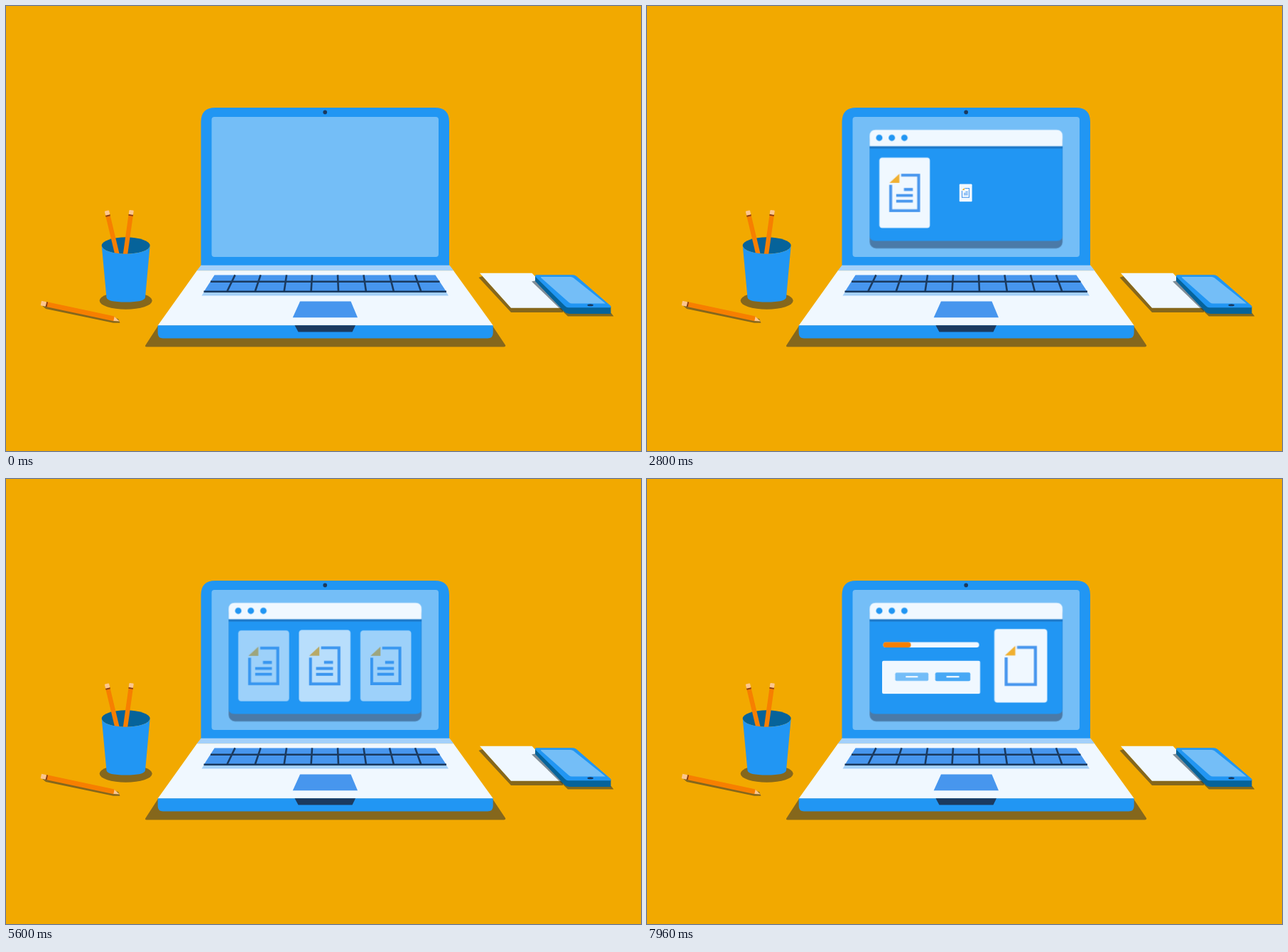
Animation, 894 px wide and 626 px high, one loop 8000 ms. Source, as an HTML page without scripts:

```html
<!DOCTYPE html>
<html lang="en">
<head>
<meta charset="utf-8">
<title>Desk</title>
<style>
  html, body { margin: 0; width: 100%; height: 100%; overflow: hidden; background: #f2a900; }
  svg { display: block; width: 100vw; height: 100vh; }

  .blue { fill: #2196f3; }
  .sky { fill: #74bef7; }
  .deep { fill: #06639a; }
  .navy { fill: #1b3a5f; }
  .white { fill: #f0f8ff; }
  .key { fill: #4796ee; }
  .pale { fill: #a3d0fa; }
  .shade { fill: #85671c; }
  .orange { fill: #f77f00; }
  .cream { fill: #fcc68e; }
  .band { fill: #8a3d12; }
  .line { fill: none; stroke: #4796ee; stroke-width: 4; }

  .anim { animation: 8s ease-in-out infinite both; }
  .window { animation-name: window; }
  .splash { animation-name: splash; }
  .move { animation-name: move; }
  .one { animation-name: one; }
  .two { animation-name: two; }
  .three { animation-name: three; }
  .text { animation-name: text; }
  .pop { animation-name: pop; }
  .cancel { animation-name: cancel; }
  .accept { animation-name: accept; }

  @keyframes window {
    0%, 7% { transform: scale(0); }
    12.5%, 100% { transform: scale(1); }
  }
  @keyframes splash {
    0%, 16% { transform: translateY(12px); opacity: 0; }
    21.5%, 30% { transform: none; opacity: 1; }
    33%, 100% { transform: translateY(12px); opacity: 0; }
  }
  @keyframes one {
    0%, 32.5% { transform: scale(0); opacity: 1; }
    35.5% { transform: scale(1.05); }
    37%, 40.5% { transform: scale(1); opacity: 1; }
    42.5% { transform: scale(1); opacity: .6; }
    45%, 50% { transform: scale(1.04); opacity: 1; }
    52.5%, 70% { transform: scale(1); opacity: .6; }
    72.5%, 82.5% { transform: scale(1.04); opacity: 1; }
    84% { transform: scale(1.14); }
    85.5%, 100% { transform: scale(1.04); opacity: 1; }
  }
  @keyframes two {
    0%, 34% { transform: scale(0); opacity: 1; }
    37% { transform: scale(1.05); }
    38.5%, 40.5% { transform: scale(1); opacity: 1; }
    42.5%, 61% { transform: scale(1); opacity: .6; }
    63.5%, 68.5% { transform: scale(1.04); opacity: 1; }
    71%, 83% { transform: scale(1); opacity: .6; }
    88%, 100% { transform: scale(0); opacity: .6; }
  }
  @keyframes three {
    0%, 36% { transform: scale(0); opacity: 1; }
    39% { transform: scale(1.05); }
    40.5% { transform: scale(1); opacity: 1; }
    42.5%, 51.5% { transform: scale(1); opacity: .6; }
    54%, 59% { transform: scale(1.04); opacity: 1; }
    61.5%, 83% { transform: scale(1); opacity: .6; }
    88%, 100% { transform: scale(0); opacity: .6; }
  }
  @keyframes text {
    0%, 83% { opacity: 1; }
    87%, 100% { opacity: 0; }
  }
  @keyframes move {
    0%, 85.5% { transform: none; }
    91.5%, 100% { transform: translateX(163.5px); }
  }
  @keyframes pop {
    0%, 90.5% { transform: scale(0); }
    93% { transform: scale(1.04); }
    93.5%, 100% { transform: scale(1); }
  }
  @keyframes cancel {
    0%, 97.5% { opacity: 1; }
    99.5%, 100% { opacity: .6; }
  }
  @keyframes accept {
    0%, 97.5% { transform: scale(1); opacity: 1; }
    98.75% { transform: scale(1); opacity: .6; }
    100% { transform: scale(1.08); opacity: .92; }
  }
</style>
</head>
<body>
<svg viewBox="0 0 894 626" preserveAspectRatio="none">
  <defs>
    <g id="pencil">
      <rect class="orange" x="-3.2" y="6" width="6.4" height="58"/>
      <rect class="band" x="-3.2" y="6" width="6.4" height="2.2"/>
      <rect class="cream" x="-3.2" width="6.4" height="6.2" rx="1"/>
    </g>
    <g id="page">
      <rect class="white" x="-35.8" y="-49.8" width="71.6" height="99.6" rx="4"/>
      <path class="line" d="M-5-25H19.8V25.2H-19.8V-11.5"/>
      <path fill="#f0b030" d="M-21.5-14L-7.5-27V-14Z"/>
    </g>
    <path id="text" class="line" d="M-1-4.8H11.5M-12 3.7H11.5M-12 11.7H11.5"/>
    <g id="button">
      <rect class="blue" x="-23.4" y="-5.8" width="46.8" height="11.6" rx="2"/>
      <rect fill="#fff" x="-8.5" y="-1" width="17" height="2"/>
    </g>
  </defs>

  <rect width="894" height="626" fill="#f2a900"/>

  <!-- cup and pencils -->
  <ellipse class="shade" cx="168.7" cy="414.5" rx="37" ry="12.3"/>
  <ellipse class="deep" cx="168.7" cy="337" rx="34" ry="11.7"/>
  <use href="#pencil" transform="translate(141.8 288) rotate(-13.5)"/>
  <use href="#pencil" transform="translate(176.7 287.2) rotate(8)"/>
  <path class="blue" d="M134.7 337A34 11.7 0 0 0 202.7 337L196 410Q195 416.5 168.7 416.5T141.5 410Z"/>

  <path class="shade" d="M49 420L56 426L151 445.8H160.5L158 440Z"/>
  <g transform="translate(49.3 418) rotate(12)">
    <path class="cream" d="M104-3.4L113.5 2L104 3.4Z"/>
    <rect class="orange" x="8" y="-3.4" width="97" height="6.8"/>
    <rect class="band" x="7" y="-3.4" width="2.2" height="6.8"/>
    <rect class="cream" y="-3.4" width="7.2" height="6.8" rx="1"/>
  </g>

  <!-- paper and phone -->
  <path class="shade" d="M665.5 382L671 380L711 424H784V431H711Z"/>
  <path class="white" d="M667 375.7H740.5L786 424.8H711Z"/>
  <path fill="#1b2d38" opacity=".52" d="M740 387.5L747 386L795 432H852L855.5 436.5H791Z"/>
  <path class="deep" d="M745 380V387L786 430Q789 433 793 433H851.5V423Z"/>
  <path class="blue" d="M747 378.3H798Q801 378.3 803 380L851.5 422V424.3H792Q789 424.3 787 422L745.5 381Q744 378.3 747 378.3Z"/>
  <path class="sky" d="M754 381H795Q797 381 799 382.5L844 418.6H797Q794.5 418.6 792.5 417L753.5 382.5Q752 381 754 381Z"/>
  <ellipse class="navy" cx="822.7" cy="420.7" rx="4.2" ry="1.5"/>

  <!-- laptop -->
  <path class="shade" d="M214 450H685L703 477Q704 479.5 701 479.5H198Q195 479.5 196.500 477Z"/>
  <path class="blue" d="M274.500 365V163Q274.500 143 294.500 143H604Q624 143 624 163V365Z"/>
  <rect class="sky" x="289.5" y="156" width="319.5" height="197" rx="4"/>
  <circle class="navy" cx="449.2" cy="149.4" r="2.8"/>
  <path class="pale" d="M274.500 364.700H624.500L630.500 372.500H268.500Z"/>
  <path class="white" d="M268.800 372.200H630L686 449.800H213.500Z"/>
  <path class="blue" d="M213.700 449.300H685.700V460Q685.700 467.500 678 467.500H221Q213.700 467.500 213.700 460Z"/>
  <path class="navy" d="M406.500 449.300H492L487.500 458.500H411.500Z"/>
  <path class="key" d="M414 415.500H485.500L495 438.200H403.700Z"/>
  <path class="pale" d="M279 402H619.500L623 407.500H275.500Z"/>
  <path class="key" d="M293.500 378.400H604.500L620 402H278.500Z"/>
  <path fill="none" stroke="#1b3a5f" stroke-width="2.600" d="M288 387.700H610.500M278.500 401.700H620M322.500 378.400L311 402M358.500 378.400L350.500 402M395 378.400L391.500 402M431 378.400L429.500 402M467 378.400L468 402M503.500 378.400L507 402M540 378.400L546 402M576 378.400L584.500 402"/>

  <!-- app window -->
  <g transform="translate(449.3 257.5)">
    <g class="anim window">
      <g transform="translate(-449.3 -257.5)">
        <rect fill="#4a7aa8" x="313.5" y="180" width="271.5" height="161" rx="9"/>
        <path class="blue" d="M313.500 190H585V323Q585 330.500 577 330.500H321.500Q313.500 330.500 313.500 323Z"/>
        <path fill="#1d78c8" d="M313.500 196H585V200.500H313.500Z"/>
        <path class="white" d="M313.500 197.300V183Q313.500 174.300 322 174.300H576.500Q585 174.300 585 183V197.300Z"/>
        <circle class="blue" cx="327" cy="185.4" r="4.5"/>
        <circle class="blue" cx="344.7" cy="185.4" r="4.5"/>
        <circle class="blue" cx="362.4" cy="185.4" r="4.500"/>
      </g>
    </g>
  </g>

  <g class="anim splash">
    <path fill="none" stroke="#f0f8ff" stroke-width="7" d="M447.500 235H465.300V288.500H433.500V249"/>
    <path fill="#f2b01e" d="M428.300 246L445.200 229.300V246Z"/>
  </g>

  <!-- document cards -->
  <g transform="translate(534.7 262.8)">
    <g class="anim three"><use href="#page"/><use href="#text"/></g>
  </g>
  <g transform="translate(448.7 262.8)">
    <g class="anim two"><use href="#page"/><use href="#text"/></g>
  </g>
  <g transform="translate(362.7 262.8)">
    <g class="anim move">
      <g class="anim one"><use href="#page"/><use class="anim text" href="#text"/></g>
    </g>
  </g>

  <!-- progress and dialog -->
  <g transform="translate(400 233.3)">
    <g class="anim pop">
      <rect class="white" x="-67.5" y="-3.7" width="135" height="7.4" rx="3.7"/>
      <rect class="orange" x="-67.5" y="-3.7" width="39" height="7.4" rx="3.7"/>
    </g>
  </g>
  <g transform="translate(400 279)">
    <g class="anim pop">
      <rect class="white" x="-69" y="-23.2" width="138" height="46.4" rx="2"/>
      <g transform="translate(-27.2 -.8)"><use class="anim cancel" href="#button"/></g>
      <g transform="translate(30.5 -.8)"><use class="anim accept" href="#button"/></g>
    </g>
  </g>
</svg>
</body>
</html>
```
